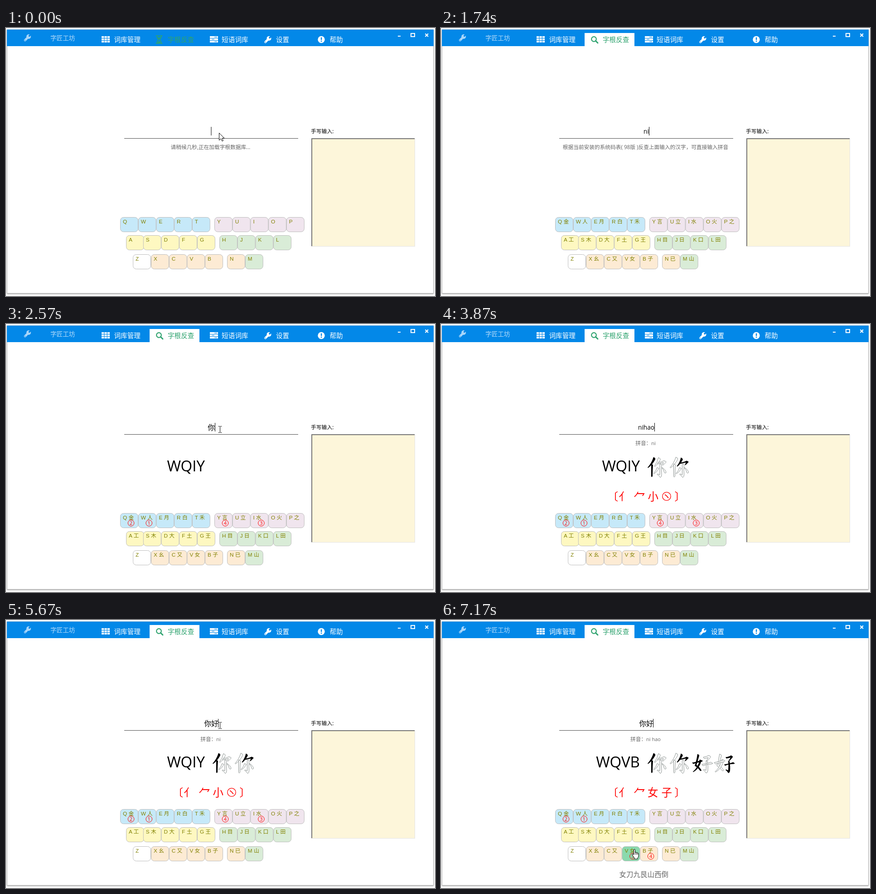
Recreate the animation shown at these times as an HTML page. Size 947 by 591 pixels, loop 9.17 s.

```html
<!DOCTYPE html>
<html lang="zh-CN">
<head>
<meta charset="utf-8">
<title>字根反查</title>
<style>
html, body { margin: 0; width: 100%; height: 100%; overflow: hidden; background: #fff; }
svg { display: block; width: 947px; height: 591px; }
text { font-family: 'Open Sans', 'Noto Sans CJK SC', 'Noto Sans CJK', sans-serif; white-space: pre; }
.key { font-family: 'Liberation Sans', 'Noto Sans CJK SC', 'Noto Sans CJK', sans-serif; }
</style>
</head>
<body>
<svg id="stage" viewBox="0 0 947 591" xmlns="http://www.w3.org/2000/svg"></svg>
<script>
const LOOP = 9170;
const BLUE = '#0388e8', GREEN = '#2fa36f', OLIVE = '#808000', RED = '#f00';

const text = (s, x, y, size, fill = '#000', extra = '') =>
  `<text x="${x}" y="${y}" font-size="${size}" fill="${fill}" ${extra}>${s}</text>`;
const rect = (x, y, w, h, fill, extra = '') =>
  `<rect x="${x}" y="${y}" width="${w}" height="${h}" fill="${fill}" ${extra}/>`;
const path = (d, fill, stroke = 'none', width = 1, extra = '') =>
  `<path d="${d}" fill="${fill}" stroke="${stroke}" stroke-width="${width}" ${extra}/>`;
const at = (x, y, body) => `<g transform="translate(${x} ${y})">${body}</g>`;
const MID = 'text-anchor="middle"', END = 'text-anchor="end"';

// Title bar icons
const wrench = color =>
  path('M3 13L10 6', 'none', color, 4.6, 'stroke-linecap="round"') +
  `<circle cx="11" cy="5" r="5" fill="${color}"/>` +
  path('M11.5 4.5L17 -1', 'none', BLUE, 3.6) +
  `<circle cx="3" cy="13" r="0.9" fill="${BLUE}"/>`;

function gridIcon() {
  let s = '';
  for (let i = 0; i < 9; i++) s += rect(i % 3 * 6.4, Math.floor(i / 3) * 5, 5.2, 4, '#fff');
  return s;
}

function barsIcon() {
  let s = '';
  for (let i = 0; i < 3; i++) {
    s += rect(0, i * 5, 18, 4, '#fff') + rect(i === 1 ? 4 : 10, i * 5 + 1.5, 6, 1, BLUE);
  }
  return s;
}

const hourglass = path('M0 1H15M0 18H15M2.5 1C2.5 7 6 8 6 9.5S2.5 12 2.5 18M12.5 1C12.5 7 9 8 9 9.5S12.5 12 12.5 18',
  'none', GREEN, 1.7) + path('M4 5H11L7.5 9ZM4 17L7.5 12L11 17Z', GREEN);
const lens = `<circle cx="6.5" cy="6.5" r="5.3" fill="none" stroke="${GREEN}" stroke-width="2.2"/>` +
  path('M10.5 10.5L15 15', 'none', GREEN, 2.8, 'stroke-linecap="round"');

const frame =
  rect(2.5, 3.5, 941, 581.5, '#fff', 'stroke="#c4c4c4" style="filter:drop-shadow(0 1px 1px #0007)"') +
  rect(2, 3.5, 942, 36.5, BLUE) +
  at(39, 14, wrench('#a9d6fa')) + text('字匠工坊', 98, 26.5, 13.6, '#b4dbfa') +
  at(211, 18, gridIcon()) + text('词库管理', 238.5, 31, 14.6, '#fff') +
  at(450, 18, barsIcon()) + text('短语词库', 476, 31, 14.7, '#fff') +
  at(569.5, 18, wrench('#fff')) + text('设置', 596, 31, 14.6, '#fff') +
  '<circle cx="696" cy="25.5" r="7.7" fill="#fff"/>' +
  rect(694.9, 20.5, 2.4, 6, BLUE) + rect(694.9, 28, 2.4, 2.3, BLUE) +
  text('帮助', 714.5, 31, 14.6, '#fff') +
  rect(865, 17, 6, 2, '#fff') +
  path('M894 12H902V19H894Z', 'none', '#fff', 2) +
  path('M925.5 12.5L932 19M932 12.5L925.5 19', 'none', '#fff', 2.2) +
  text('手写输入:', 673, 232.3, 11.8) +
  rect(674, 243, 229, 239, '#e3e3e3') + rect(674, 243, 228, 238, '#808080') +
  rect(675, 244, 227, 237, '#696969') + rect(676, 245, 226, 236, '#fdf6da');

// Keyboard: first x, y, colour, then letter and root pairs
const ROWS = [
  [252.5, 417.5, '#c6e9f9', 'Q金W人E月R白T禾'],
  [460.5, 417.5, '#f0e5ee', 'Y言U立I水O火P之'],
  [265.5, 457.5, '#fef8c1', 'A工'],
  [303.3, 457.5, '#fef8c1', 'S木D大F土G王'],
  [471.5, 457.5, '#d9ecd7', 'H目J日K口L田'],
  [280.5, 499.5, '#fff', 'Z '],
  [320.5, 499.5, '#fdebd4', 'X幺C又V女B子'],
  [488.5, 499.5, '#fdebd4', 'N已'],
  [528.3, 499.5, '#d9ecd7', 'M山'],
];
const keys = {};
for (const [x, y, fill, pairs] of ROWS) {
  for (let i = 0; i < pairs.length; i += 2) {
    keys[pairs[i]] = { x: x + i / 2 * 39.7, y, fill, root: pairs[i + 1] };
  }
}

function keyboard(s) {
  let out = '';
  for (const [letter, k] of Object.entries(keys)) {
    const fill = letter === s.hover ? '#8ad9ad' : k.fill;
    const label = s.ready ? `${letter} ${k.root}` : letter;
    out += rect(k.x, k.y, 39, 32, fill, 'rx="7" stroke="#bdbdbd"') +
      text(label, k.x + 5.5, k.y + 13.2, 11.8, OLIVE, 'class="key"');
  }
  [...s.code].forEach((letter, i) => {
    const cx = keys[letter].x + 23.5, cy = keys[letter].y + 21.5;
    out += `<circle cx="${cx}" cy="${cy}" r="6.8" fill="none" stroke="${RED}"/>` +
      text(i + 1, cx, cy + 4, 11, RED, MID);
  });
  return out;
}

// Brush characters, each split into its roots
const NI = [
  ['M13 0Q18 2 17 5Q11 17 1 24L0 23Q9 13 13 0Z', 'M8 15L12 17Q11 30 11 42Q9 46 8 42Z'],
  ['M24 1Q29 3 28 6Q23 16 16 21L15 20Q22 11 24 1Z', 'M23 12Q31 11 36 8Q41 9 41 11Q38 14 34 18L33 17L35 12L22 15Z'],
  ['M27 15L31 16Q30 30 31 39Q31 44 28 45Q26 41 21 38L22 37L27 39Z', 'M21 23L25 25Q21 33 14 37L13 36Q19 31 21 23Z',
   'M32 23Q40 28 41 34Q39 37 37 34Q36 28 32 24Z'],
];
const HAO = [
  ['M12 2Q17 4 16 6Q13 17 10 26Q18 32 21 38Q20 41 17 38Q13 32 6 28Q10 17 12 2Z',
   'M17 14L21 16Q17 34 3 42L2 41Q14 31 17 14Z', 'M0 21Q12 19 20 15L24 17L22 19Q11 21 3 24Z'],
  ['M25 9Q33 8 37 5Q42 7 41 9Q37 14 33 18L32 17L36 10L27 12Z',
   'M31 17L34 18Q36 30 35 39Q34 44 31 44Q29 40 25 37L26 36L31 38Q32 27 31 17Z',
   'M22 25Q34 23 42 20L46 23L43 24Q32 24 24 28Z'],
];
const brush = (roots, solid, x) => at(x, 293.5, roots.map((strokes, i) => strokes.map(d =>
  i === solid ? path(d, '#000') : path(d, '#fff', '#7d8583', 0.9)).join('')).join(''));

const red = (s, x) => text(s, x, 388.5, 23.5, RED);
const brackets = red('〔', 367.5) + red('〕', 515.5);
const person = red('亻', 392.5) +
  path('M435 370Q432 377 427 381M432.5 374H448L445 379', 'none', RED, 1.8);
const DETAILS = {
  WQIY: brush(NI, 0, 456) + brush(NI, 1, 505.5) + brackets + person + red('小', 456.5) +
    `<circle cx="498" cy="380" r="9.2" fill="none" stroke="${RED}" stroke-width="1.3"/>` +
    path('M494 376Q499 379 502 384', 'none', RED, 1.6),
  WQVB: brush(NI, 0, 456) + brush(NI, 1, 505.5) + brush(HAO, 0, 554) + brush(HAO, 1, 603) +
    brackets + person + red('女', 456) + red('子', 486.5),
};

const SHORT_LIST = ['你', '你好', '你们', '你的', '你是谁', '你好吗', '你在哪里', '你知道吗'];
const LONG_LIST = ['你好', '你好宁舟', '你好的英文', '你好慢山谷', '你好,moon老师', '你好若禾',
  '你好宁舟 电视剧', '你好骚啊图片表情包'];

const dropdown = items => items.map((item, i) => {
  const y = 243.5 + i * 40.7;
  return rect(246.5, y, 243, 40.7, i ? '#fff' : '#dc8b8f', 'stroke="#bfe0f5"') +
    text(item, 470, y + 25, 11.7, '#000', END);
}).join('');

const POINTERS = {
  arrow: at(470.5, 231.5, path('M0 0V16L4 12.5L6.5 18L9 17L6.7 11.5H11.5Z', '#fff', '#000')),
  beam: path('M469 225.5H471.5L472.5 226.5L473.5 225.5H476M472.5 226V239M469 239.5H471.5L472.5 238.5L473.5 239.5H476',
    'none', '#000'),
  hand: at(421.5, 505.5, path('M4 12V2Q4 0 5.5 0T7 2V8Q7 6.500 8.500 6.500T10 8.500Q10 7 11.300 7.300T12.500 9' +
    'Q12.500 8 13.700 8.500T14.500 10.500V15Q14.500 18 12.500 19V21.500H5.500V19L1 13Q0 11 1.500 10.500T4 12.500Z', '#fff', '#000') +
    path('M7 8V12M10 8.5V12M12.5 9.500V12', 'none', '#000', 0.9)),
};

const LOADING = '请稍候几秒,正在加载字根数据库...';
const READY = '根据当前安装的系统码表( 98版 )反查上面输入的汉字，可直接输入拼音';
const pinyin = s => `拼音：<tspan font-size="11">${s}</tspan>`;

// Each step lists only what changes; typed = [text, caret x]
const STEPS = [
  [0, { ready: false, hint: LOADING, typed: ['', 453], caret: true, pointer: 'arrow',
        list: null, code: '', details: '', hover: '', tip: '' }],
  [460, { ready: true, hint: READY, pointer: 'beam' }],
  [1460, { typed: ['n', 457.5], pointer: '' }],
  [1740, { typed: ['ni', 459.5] }],
  [2020, { list: SHORT_LIST, caret: false, pointer: 'beam' }],
  [2570, { list: null, typed: ['你', 461.5], caret: true, hint: '', code: 'WQIY' }],
  [2700, { typed: ['', 453.5], hint: pinyin('ni'), details: 'WQIY', pointer: '' }],
  [3160, { typed: ['n', 457.5] }],
  [3440, { typed: ['ni', 459.5] }],
  [3720, { typed: ['nih', 463.5] }],
  [3870, { typed: ['nihao', 471.5] }],
  [4310, { list: LONG_LIST, caret: false, pointer: 'beam' }],
  [4740, { caret: true }],
  [5670, { list: null, typed: ['你好', 468.5] }],
  [6170, { code: 'WQVB', details: 'WQVB', hint: pinyin('ni hao'), caret: false, pointer: '' }],
  [6670, { hover: 'V', caret: true, pointer: 'hand' }],
  [7170, { tip: '女刀九艮山西倒' }],
];
const states = [];
for (const [start, change] of STEPS) {
  states.push({ ...states[states.length - 1], ...change, start });
}

function scene(s) {
  const [word, caretX] = s.typed;
  const latin = /^[a-z]/.test(word);
  return frame +
    (s.ready ? rect(317, 11, 110, 29, '#fff') + at(331, 18, lens) : at(330.5, 16, hourglass)) +
    text('字根反查', 357, 31, 14.6, GREEN) +
    text(word, 453, latin ? 233 : 233.7, latin ? 13.6 : 15.6, '#000', MID) +
    (s.caret ? rect(caretX - 0.5, 218, 1, 19, '#000') : '') +
    rect(261, 243, 384, 1, '#4a4a4a') +
    text(s.hint, 451.5, 266.5, 11.7, '#666', MID) +
    text(s.code, 439, 325, 33, '#000', END) +
    (DETAILS[s.details] || '') +
    keyboard(s) +
    text(s.tip, 393.5, 567, 15.5, '#666') +
    (s.list ? dropdown(s.list) : '') +
    (POINTERS[s.pointer] || '');
}

const stage = document.getElementById('stage');
const origin = performance.now();
let shown = null;

function update() {
  const t = (performance.now() - origin) % LOOP;
  const state = states.filter(s => s.start <= t).pop();
  if (state !== shown) {
    stage.innerHTML = scene(state);
    shown = state;
  }
  requestAnimationFrame(update);
}
update();
</script>
</body>
</html>
```
